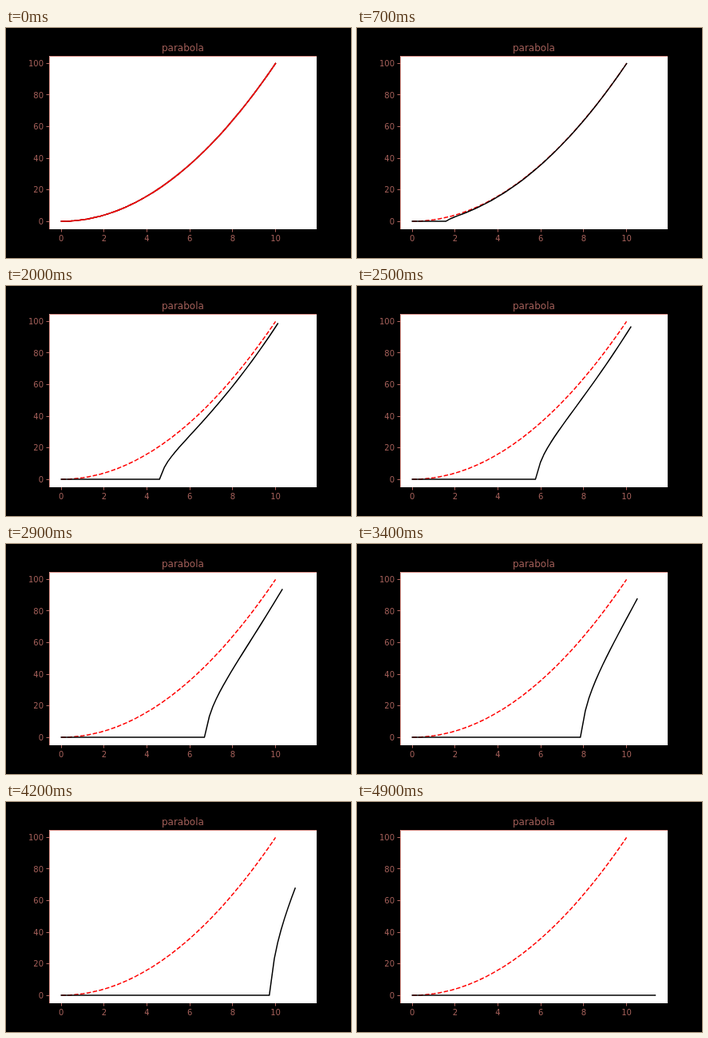
Write an HTML page that moves like this. It is 432 px wide and 288 px high and loops after 5000 ms.

```html
<!DOCTYPE html>
<html lang="en">
<head>
<meta charset="utf-8">
<title>parabola</title>
<style>
  html, body { margin: 0; width: 100%; height: 100%; overflow: hidden; background: #000; }
  svg { display: block; width: 432px; height: 288px; }
  text { font: 10px "DejaVu Sans", sans-serif; fill: #a5605a; }
  .title { font-size: 12px; text-anchor: middle; }
  .x { text-anchor: middle; }
  .y { text-anchor: end; }
  .axis { stroke: #b5665f; fill: none; }
  .edge { stroke: #dc9088; fill: none; }
  .curve { fill: none; stroke-width: 1.5; stroke-linejoin: round; }
  #guide { stroke: #f00; stroke-dasharray: 5.55 2.4; }
  #line { stroke: #000; stroke-linecap: square; }
  #cover { stroke: #f00; stroke-linecap: square; }
</style>
</head>
<body>
<svg viewBox="0 0 432 288">
  <rect width="432" height="288" fill="#000"/>
  <rect x="54" y="35" width="335" height="217" fill="#fff"/>
  <path class="edge" d="M54.5 252V35.5H389"/>
  <text class="title" x="221.4" y="28.5">parabola</text>
  <g id="ticks"></g>
  <polyline id="guide" class="curve"/>
  <polyline id="line" class="curve"/>
  <polyline id="cover" class="curve"/>
</svg>
<script>
  const STEPS = 50, STEP_MS = 100, LAST = STEPS - 1;
  const STRETCH = 0.304;
  const $ = id => document.getElementById(id);
  const px = x => 69.22 + x * 26.83;
  const py = y => 242.1 - y * 1.977;
  const at = i => 10 * i / LAST;
  const point = (x, y) => px(x).toFixed(2) + "," + py(y).toFixed(2);

  // Sideways drift of sample i once the sweep has reached sample n
  const shiftX = (i, n) => i ? Math.sqrt(at(i) ** 2 + STRETCH * at(n) ** 3 / at(i)) : 0;
  const dropY = (i, n) => Math.sqrt(at(i) ** 4 - at(n) ** 4);

  function linePoints(n) {
    const pts = [point(0, 0)];
    // A flattened sample keeps the x it had one step earlier
    if (n) pts.push(point(shiftX(n, n - 1), 0));
    for (let i = n + 1; i < STEPS; i++) pts.push(point(shiftX(i, n), dropY(i, n)));
    return pts.join(" ");
  }

  function drawTicks() {
    let out = "";
    for (let k = 0; k <= 5; k++) {
      const x = px(2 * k), y = py(20 * k);
      const tx = Math.floor(x) + 0.5, ty = Math.floor(y) + 0.5;
      out += `<path class="axis" d="M${tx} 252v3.5M54 ${ty}h-3.5"/>` +
        `<text class="x" x="${x}" y="267">${2 * k}</text>` +
        `<text class="y" x="47" y="${y + 3.8}">${20 * k}</text>`;
    }
    $("ticks").innerHTML = out;
  }

  let shown = -1;
  function frame() {
    const n = Math.floor(performance.now() / STEP_MS) % STEPS;
    if (n !== shown) {
      shown = n;
      $("line").setAttribute("points", linePoints(n));
      $("cover").style.display = n ? "none" : "inline";
    }
    requestAnimationFrame(frame);
  }

  drawTicks();
  $("guide").setAttribute("points", linePoints(0));
  $("cover").setAttribute("points", linePoints(0));
  frame();
</script>
</body>
</html>
```
